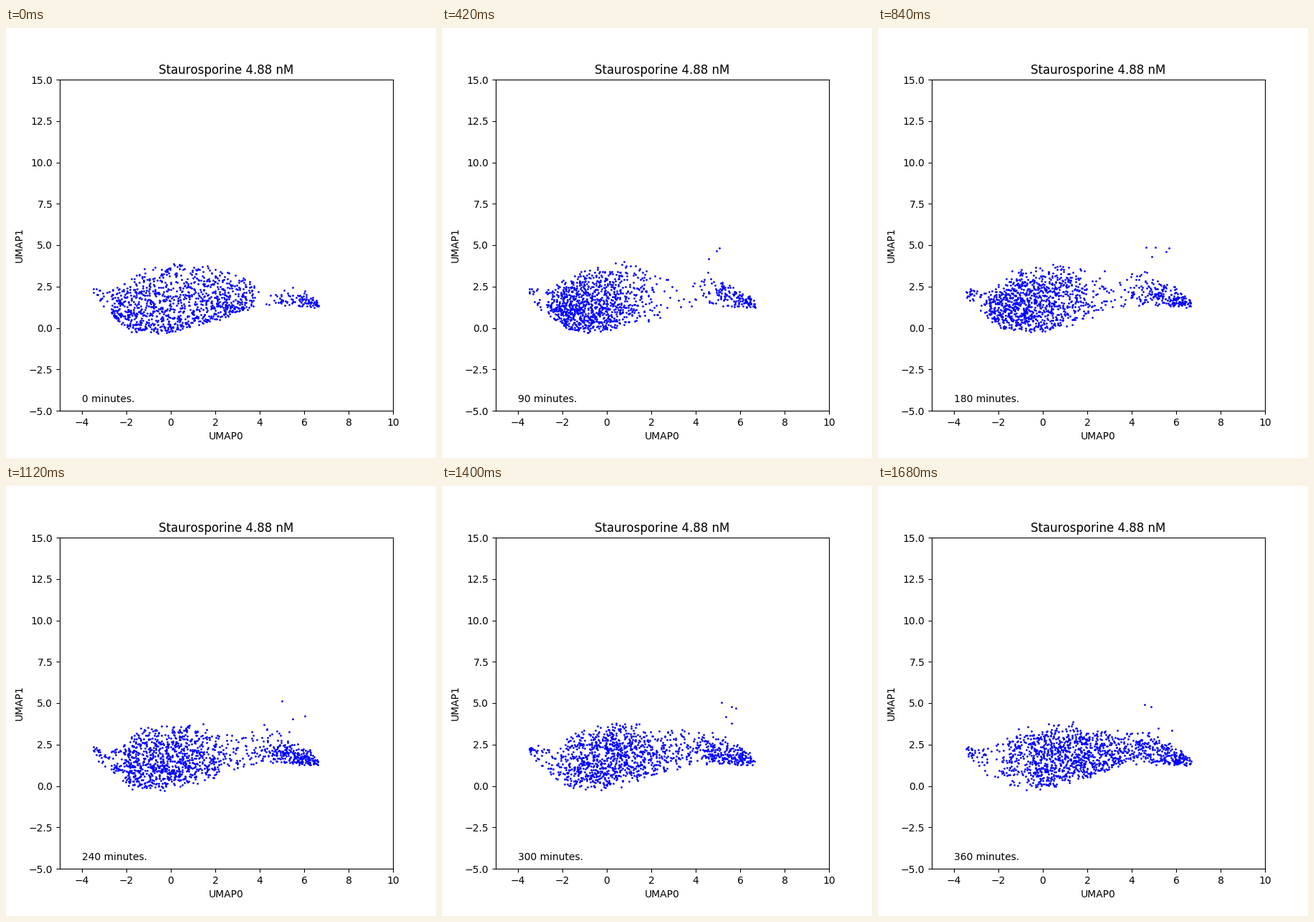
Animation of 600 by 600 pixels, one loop 1820 ms. Source, as a matplotlib script:

```python
import numpy as np
import matplotlib.pyplot as plt
from matplotlib.animation import FuncAnimation

FRAMES, STEP_MS = 13, 140
plt.rcParams["text.kerning_factor"] = 6


def lower(x):
    return np.interp(x, [-3.5, -2.6, -1.8, 0, 2, 4, 6.7],
                     [1.9, 0.7, -0.15, -0.25, 0.5, 1.4, 1.25])


def upper(x, grown):
    return np.interp(x, [-3.5, -2.4, -1.2, 0.8, 2.2, 4.5, 6.2, 6.7],
                     [2.4, 2.4, 3.65, 4.05, 3.5, 2.5 + 1.1 * grown, 2.3, 1.6])


def cells(i):
    rng = np.random.default_rng(100 + i)
    p = i / (FRAMES - 1)
    early = max(0, 1 - i / 3)

    def spread(start, end, a, b, n):
        return start + (end - start) * rng.beta(a, b, int(n))

    def fill(x, a, b):
        low, top = lower(x), upper(x, 1 - early)
        y = low + (top - low) * rng.beta(a, b, x.size)
        return np.column_stack([x, y + rng.normal(0, 0.06, x.size)])

    # The body gathers on the left, then its peak drifts right
    peak = 0.22 + 0.32 * p**2.5 + 0.1 * early
    focus = 3.2 - 2.6 * early
    body = spread(-2.7, 3.8, 1 + focus * peak, 1 + focus * (1 - peak), 1030 - 80 * p)
    # The arm fills up from its right end
    arm = spread(2.4, 6.7, 4.5 - 2.9 * p, 1.4, 100 + 270 * p)
    tip = spread(-3.5, -2.4, 0.9, 1.4, 18 + 25 * p)

    a = 0.85 + 0.75 * p**0.5
    n = min(i, 5)
    strays = np.column_stack([rng.normal(5.2, 0.5, n),
                              3.2 + 2 * min(1, i / 2) * rng.random(n)])
    return np.vstack([fill(body, a, a + 0.35), fill(arm, 1.3, 2), fill(tip, 1.3, 1.3), strays])


fig, ax = plt.subplots(figsize=(6, 6), dpi=100)
ax.set(xlim=(-5, 10), ylim=(-5, 15), xlabel="UMAP0", ylabel="UMAP1",
       title="Staurosporine 4.88 nM")
dots = ax.scatter([], [], s=1, c="blue")
label = ax.text(-4, -4.5, "")


def update(i):
    dots.set_offsets(cells(i))
    label.set_text(f"{30 * i} minutes.")
    return dots, label


anim = FuncAnimation(fig, update, frames=FRAMES, interval=STEP_MS, repeat=True)
plt.show()
```
